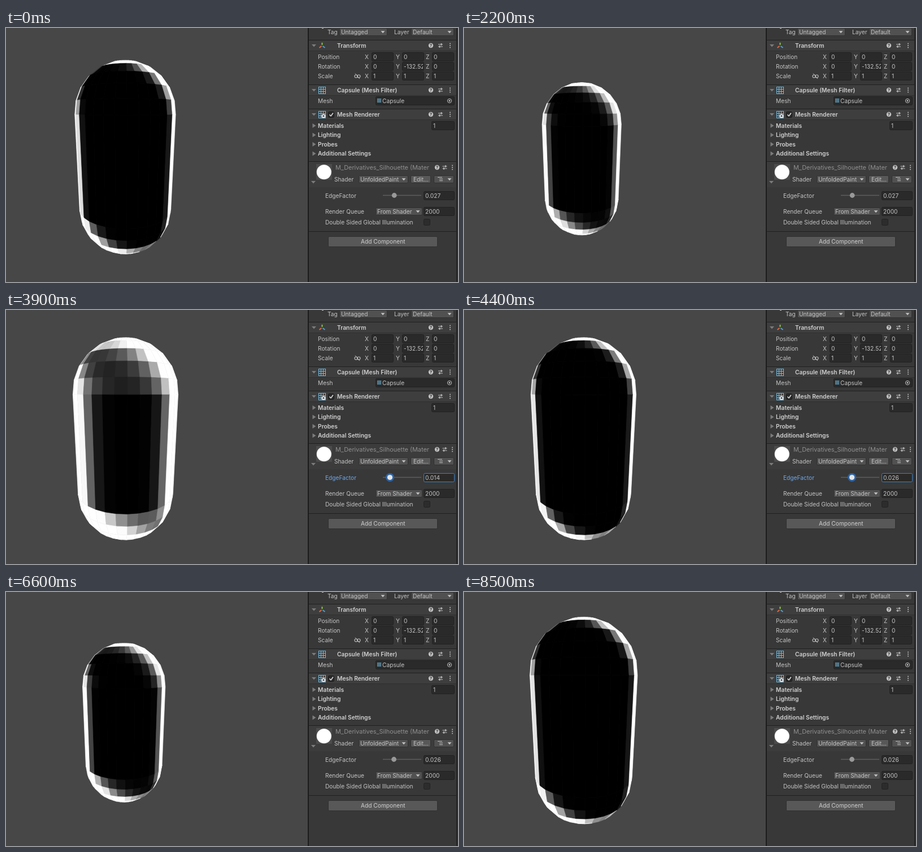
An HTML page with a canvas that plays this animation: 800x450 px, repeating every 8.6 s.

```html
<!DOCTYPE html>
<html lang="en">
<head>
<meta charset="utf-8">
<title>Silhouette shader</title>
<style>
html, body { margin: 0; width: 100%; height: 100%; overflow: hidden; background: #474747; }
canvas { display: block; width: 800px; height: 450px; }
</style>
</head>
<body>
<canvas id="stage" width="800" height="450"></canvas>
<script>
const c = document.getElementById('stage').getContext('2d');
const LOOP = 8600, STEP = 100, RAD = Math.PI / 180;
const FONT = 'Inter, Roboto, sans-serif';
const FOCAL = 390, TILT = 13 * RAD, SEGS = 32, SPIN = 1.6;

// [ms, value] keys for camera distance and the edge factor
const DIST = [[0, 2.35], [300, 2.62], [600, 3.2], [900, 4.1], [1200, 5.45], [1450, 5.75],
  [1800, 4.2], [2300, 2.7], [2700, 2.28], [2800, 2.26], [2900, 2.26], [5900, 2.26], [6100, 2.26],
  [6500, 2.62], [6900, 3.65], [7200, 4.82], [7450, 5.1], [7800, 3.7], [8200, 2.4], [8500, 2.215], [8600, 2.2]];
const EDGE = [[0, 0.027], [3200, 0.027], [3300, 0.027], [3850, 0.014], [4400, 0.026],
  [4900, 0.045], [5400, 0.014], [5800, 0.026], [5900, 0.026], [8600, 0.026]];

// Cubic Hermite through the keys with finite-difference slopes
function sample(keys, t) {
  let i = 0;
  while (i < keys.length - 2 && t >= keys[i + 1][0]) i++;
  const slope = k => {
    const a = keys[Math.max(0, k - 1)], b = keys[Math.min(keys.length - 1, k + 1)];
    return (b[1] - a[1]) / (b[0] - a[0]);
  };
  const [t0, v0] = keys[i], [t1, v1] = keys[i + 1];
  const d = t1 - t0, u = (t - t0) / d, u2 = u * u, u3 = u2 * u;
  return v0 * (2 * u3 - 3 * u2 + 1) + v1 * (3 * u2 - 2 * u3) +
    d * (slope(i) * (u3 - 2 * u2 + u) + slope(i + 1) * (u3 - u2));
}

const smooth = (lo, hi, v) => {
  const u = Math.min(1, Math.max(0, (v - lo) / (hi - lo)));
  return u * u * (3 - 2 * u);
};

const rings = [];
for (let lat = 90; lat >= 0; lat -= 15) rings.push([lat, 0.5]);
for (let lat = 0; lat >= -90; lat -= 15) rings.push([lat, -0.5]);

function vertex([lat, lift], seg, dist) {
  const la = lat * RAD, lo = (seg * 360 / SEGS + SPIN) * RAD;
  const n = [Math.cos(la) * Math.sin(lo), Math.sin(la), Math.cos(la) * Math.cos(lo)];
  const x = n[0] / 2, y = n[1] / 2 + lift, z = n[2] / 2;
  const up = y * Math.cos(TILT) - z * Math.sin(TILT);
  const k = FOCAL / (dist - y * Math.sin(TILT) - z * Math.cos(TILT));
  return { n, x: 197 + 33 / dist + x * k, y: 233.6 + 10.3 / dist - up * k };
}

// Each facet is shaded by how fast its normal turns along the screen diagonal
function capsule(dist, edge) {
  const grid = rings.map(r => Array.from({ length: SEGS + 1 }, (_, s) => vertex(r, s, dist)));
  const k = edge / 0.0265;
  c.lineWidth = 0.6;
  c.lineJoin = 'round';
  for (let i = 0; i < rings.length - 1; i++) {
    for (let j = 0; j < SEGS; j++) {
      const q = [grid[i][j], grid[i][j + 1], grid[i + 1][j + 1], grid[i + 1][j]];
      const ax = q[2].x - q[0].x, ay = q[2].y - q[0].y;
      const bx = q[3].x - q[1].x, by = q[3].y - q[1].y;
      const det = ax * by - ay * bx;
      if (det <= 0) continue;
      const s = (by + bx) / det, t = (-ax - ay) / det;
      const turn = Math.hypot(...[0, 1, 2].map(m =>
        s * (q[2].n[m] - q[0].n[m]) + t * (q[3].n[m] - q[1].n[m])));
      const g = Math.round(255 * smooth(0.017 * k, 0.041 * k, turn));
      c.fillStyle = c.strokeStyle = `rgb(${g},${g},${g})`;
      c.beginPath();
      q.forEach(p => c.lineTo(p.x, p.y));
      c.closePath();
      c.fill();
      c.stroke();
    }
  }
}

function rect(x, y, w, h, fill) {
  c.fillStyle = fill;
  c.fillRect(x, y, w, h);
}

function box(x, y, w, h, fill, line, r = 2) {
  c.beginPath();
  c.roundRect(x + 0.5, y + 0.5, w - 1, h - 1, r);
  c.fillStyle = fill;
  c.fill();
  c.strokeStyle = line;
  c.lineWidth = 1;
  c.stroke();
}

function text(s, x, y, color = '#c4c4c4', size = 10.2, weight = 400) {
  c.font = `${weight} ${size}px ${FONT}`;
  c.fillStyle = color;
  c.fillText(s, x, y + 3.6);
}

const bold = (s, x, y) => text(s, x, y, '#d0d0d0', 10.3, 600);

function disc(x, y, r, fill) {
  c.beginPath();
  c.arc(x, y, r, 0, 7);
  c.fillStyle = fill;
  c.fill();
}

function line(color, width, ...pts) {
  c.beginPath();
  for (let i = 0; i < pts.length; i += 2) c.lineTo(pts[i], pts[i + 1]);
  c.strokeStyle = color;
  c.lineWidth = width;
  c.stroke();
}

function arrow(x, y, w = 3.5, color = '#c4c4c4') {
  c.beginPath();
  c.moveTo(x - w, y - w / 2);
  c.lineTo(x + w, y - w / 2);
  c.lineTo(x, y + w / 2 + 0.5);
  c.fillStyle = color;
  c.fill();
}

const fold = (x, y) => arrow(x, y, 4, '#7c7c7c');

function foldClosed(x, y) {
  c.beginPath();
  c.moveTo(x - 2.5, y - 4);
  c.lineTo(x + 3.5, y);
  c.lineTo(x - 2.5, y + 4);
  c.fillStyle = '#7c7c7c';
  c.fill();
}

function field(x, y, w, s, border = '#212121') {
  box(x, y - 8, w, 16, '#2a2a2a', border);
  c.save();
  c.beginPath();
  c.rect(x, y - 8, w - 2, 16);
  c.clip();
  text(s, x + 3, y);
  c.restore();
}

function drop(x, y, w, s) {
  box(x, y - 7, w, 14, '#515151', '#303030');
  text(s, x + 3, y);
  arrow(x + w - 8, y);
}

// Help, presets and menu icons, centred `gap` apart
function tools(x, y, gap = 17) {
  const p = x + gap, m = x + 2 * gap;
  disc(x, y, 4.2, '#c4c4c4');
  text('?', x - 2.3, y - 0.3, '#383838', 8, 700);
  line('#c4c4c4', 1, p - 4, y - 2, p + 4, y - 2);
  line('#c4c4c4', 1, p - 4, y + 2, p + 4, y + 2);
  line('#c4c4c4', 1.4, p + 1.5, y - 4, p + 1.5, y);
  line('#c4c4c4', 1.4, p - 1.5, y, p - 1.5, y + 4);
  for (const d of [-3.5, 0, 3.5]) rect(m - 0.8, y + d - 0.8, 1.7, 1.7, '#c4c4c4');
}

function mesh(x, y, size) {
  const cell = (size - 1) / 3;
  for (let i = 0; i <= 3; i++) {
    const d = i * cell + 0.5;
    line('#72bde2', 1, x + d, y, x + d, y + size);
    line('#72bde2', 1, x, y + d, x + size, y + d);
  }
}

function header(y, title) {
  rect(536, y - 10, 261, 20, '#3e3e3e');
  rect(536, y - 10, 261, 1, '#202020');
  rect(536, y + 9, 261, 1, '#303030');
  fold(545, y);
  bold(title, 586, y);
  tools(752, y);
}

function axes() {
  line('#8dc63f', 2, 559.5, 30, 559.5, 26);
  line('#e8683c', 2, 558.5, 32, 554.5, 35);
  line('#4a9fe0', 2, 560.5, 32, 564.5, 35);
}

function transform() {
  header(31, 'Transform');
  axes();
  const rows = [['Position', '0', '0', '0'], ['Rotation', '0', '-132.52', '0'], ['Scale', '1', '1', '1']];
  rows.forEach(([name, ...vals], i) => {
    const y = 51 + 17 * i;
    text(name, 552, y);
    vals.forEach((v, k) => {
      text('XYZ'[k], [635, 690, 743][k], y);
      field([647, 701, 754][k], y, 39, v);
    });
  });
  c.strokeStyle = '#b8b8b8';
  c.lineWidth = 1.2;
  for (const x of [617, 622]) {
    c.beginPath();
    c.roundRect(x, 83, 5, 5, 2.5);
    c.stroke();
  }
  line('#b8b8b8', 1, 618, 80.5, 626, 90);
}

function components() {
  header(110, 'Capsule (Mesh Filter)');
  mesh(553, 104, 13);
  text('Mesh', 552, 129);
  box(654, 121, 140, 16, '#2a2a2a', '#212121');
  c.globalAlpha = 0.6;
  mesh(657, 125, 7);
  c.globalAlpha = 1;
  text('Capsule', 666, 129);
  c.beginPath();
  c.arc(785, 129, 3.6, 0, 7);
  c.strokeStyle = '#c4c4c4';
  c.lineWidth = 1;
  c.stroke();
  disc(785, 129, 1.4, '#c4c4c4');

  header(153, 'Mesh Renderer');
  mesh(553, 147, 13);
  disc(562, 156, 3.6, '#d8e6ee');
  disc(562, 156, 1.4, '#3e3e3e');
  box(570, 148, 11, 11, '#2a2a2a', '#191919');
  line('#e0e0e0', 1.5, 572.5, 153.5, 575, 156, 579, 150.5);
  ['Materials', 'Lighting', 'Probes', 'Additional Settings'].forEach((s, i) => {
    const y = 173 + 16.5 * i;
    foldClosed(545, y);
    bold(s, 552, y);
  });
  field(753, 173, 41, '1');
}

function material(edge, active) {
  rect(536, 236, 261, 46, '#3c3c3c');
  rect(536, 236, 261, 1, '#202020');
  rect(549, 241, 28, 28, '#4c4c4c');
  disc(562.8, 255.2, 13, '#fff');
  fold(544, 273);
  text('M_Derivatives_Silhouette (Mater', 583, 247, '#8f8f8f', 10.9);
  tools(763, 247, 13.5);
  text('Shader', 581, 268);
  drop(624, 268, 88, 'UnfoldedPaint');
  box(716, 261, 36, 14, '#585858', '#303030');
  text('Edit...', 721, 268);
  box(757, 261, 36, 14, '#515151', '#303030');
  line('#c4c4c4', 1, 764, 264.5, 772, 264.5);
  line('#c4c4c4', 1, 767, 267.5, 773, 267.5);
  line('#c4c4c4', 1, 767, 270.5, 773, 270.5);
  arrow(785, 268);

  text('EdgeFactor', 565, 297, active ? '#6fa8ea' : undefined);
  line('#5e5e5e', 1.6, 667, 296.5, 735, 296.5);
  const knob = 671 + edge * 600;
  if (active) disc(knob, 296.5, 7.5, '#2f64a4');
  disc(knob, 296.5, active ? 4.6 : 4.4, active ? '#e6e6e6' : '#999');
  field(739, 297, 55, edge.toFixed(3), active ? '#3d80c4' : undefined);

  text('Render Queue', 565, 325);
  drop(654, 325, 83, 'From Shader');
  field(739, 325, 55, '2000');
  text('Double Sided Global Illumination', 565, 344);
  box(739, 338, 12, 12, '#2c2c2c', '#222');
  rect(536, 360, 261, 1, '#202020');
  box(570, 369, 194, 19, '#585858', '#303030');
  text('Add Component', 628, 378.5, '#d0d0d0');
}

function panel(edge, active) {
  rect(534, 0, 266, 450, '#383838');
  rect(534, 0, 2, 450, '#1c1c1c');
  rect(797, 0, 2, 450, '#222');
  rect(559, 0, 3, 1, '#c4c4c4');
  text('Tag', 569, 7);
  drop(590, 7, 85, 'Untagged');
  text('Layer', 687, 7);
  drop(717, 7, 76, 'Default');
  transform();
  components();
  material(edge, active);
}

function draw(now) {
  const t = Math.floor((now % LOOP) / STEP) * STEP;
  const edge = sample(EDGE, t);
  rect(0, 0, 800, 450, '#474747');
  capsule(sample(DIST, t), edge);
  panel(edge, t >= 3400 && t < 5900);
}

const start = performance.now();
function tick() {
  draw(performance.now() - start);
  requestAnimationFrame(tick);
}
tick();
</script>
</body>
</html>
```
